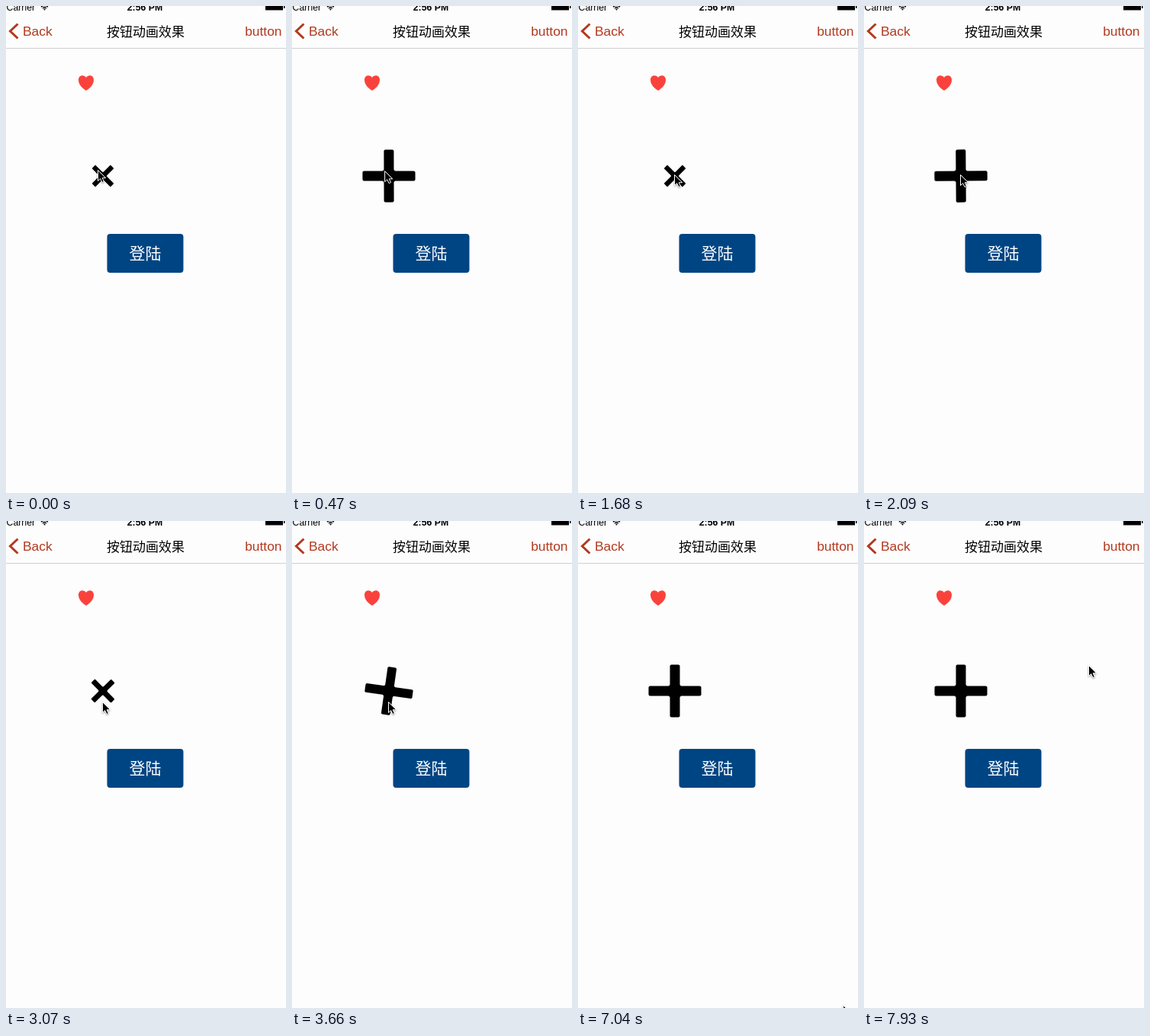
An HTML page for the animation above (7990 ms loop, 367x639 px).

```html
<!DOCTYPE html>
<html lang="zh">
<head>
<meta charset="utf-8">
<style>
  html, body { margin: 0; width: 100%; height: 100%; overflow: hidden; background: #fdfdfd; }
  svg { display: block; width: 367px; height: 639px; }
  text { font-family: "Liberation Sans", Arial, sans-serif; }
  .cjk { font-family: "Noto Sans CJK SC", "Noto Sans CJK", sans-serif; text-anchor: middle; }
</style>
</head>
<body>
<svg viewBox="0 0 367 639">
  <!-- status bar -->
  <g font-size="12.3">
    <text x="0.5" y="5.5">Carrier</text>
    <text x="182" y="5.5" text-anchor="middle" font-weight="bold">2:56 PM</text>
  </g>
  <path d="M46 1.2Q50.500 -2 55 1.200M48 3Q50.500 1 53 3" fill="none" stroke="#000" stroke-width="1.400"/>
  <circle cx="50.500" cy="4.500" r="1.100"/>
  <path d="M340 0H363V5.500H340ZM364 0H365.500V3H364Z"/>

  <!-- navigation bar -->
  <path d="M0 55.500H367" stroke="#d0d0d0"/>
  <path d="M15.500 23.500L5.500 33L15.500 42.500" fill="none" stroke="#b2391f" stroke-width="3"/>
  <g font-size="17.400" fill="#b2391f">
    <text x="22" y="39">Back</text>
    <text x="361.500" y="39" text-anchor="end">button</text>
  </g>
  <text class="cjk" x="183" y="39.500" font-size="17" font-weight="500">按钮动画效果</text>

  <path fill="#fa423c" d="M105 94C103 90 95 90 95 97C95 104 101 108.500 105 111C109 108.500 115 104 115 97C115 90 107 90 105 94Z"/>

  <rect x="132.500" y="299" width="100" height="51" rx="4" fill="#004583"/>
  <text class="cjk" x="182.500" y="332" font-size="21" fill="#fff">登陆</text>

  <g id="plus">
    <rect x="-34.500" y="-6.500" width="69" height="13" rx="2"/>
    <rect x="-6.500" y="-34.500" width="13" height="69" rx="2"/>
    <path d="M14.500 0L0 14.500L-14.500 0L0 -14.500Z"/>
  </g>

  <path id="cursor" d="M.5 .5V14.500L3.700 11.600L6 16.500L8.400 15.400L6.200 10.700H10.700Z"
        stroke="#fff" style="filter: drop-shadow(0 1px 1px #0006)"/>
</svg>
<script>
const LOOP = 7990;
const plus = document.getElementById('plus');
const cursor = document.getElementById('cursor');

// Taps alternate between opening to a plus and closing to a small cross.
const taps = [60, 930, 1740, 2730, 3540];
const LEAD = 25;

// Pointer path: time, x, y
const path = [
  [0, 120, 215], [300, 120, 215], [600, 122, 217], [1350, 122, 217],
  [1600, 126, 221], [2200, 126, 221], [2450, 126, 237], [3750, 126, 237],
  [4100, 331, 645], [7039, 331, 645], [7040, 347, 636], [7095, 355, 582],
  [7150, 370, 570], [7569, 370, 570], [7570, 342, 394], [7690, 305, 279],
  [7870, 305, 279], [7930, 294, 189], [LOOP, 294, 189]
];

// Step response of a damped spring, 0 to 1
function spring(t, halfPeriod, decay) {
  const p = Math.PI * t / halfPeriod;
  return 1 - Math.exp(-decay * p) * (Math.cos(p) + decay * Math.sin(p));
}

function pointer(t) {
  const i = path.findIndex(k => k[0] > t);
  const [t0, x0, y0] = path[i - 1], [t1, x1, y1] = path[i];
  const u = (t - t0) / (t1 - t0);
  return [x0 + (x1 - x0) * u, y0 + (y1 - y0) * u];
}

function plusPose(t) {
  const count = taps.filter(tap => tap <= t).length;
  if (!count) return [45, 0.5];
  const age = t - taps[count - 1] + LEAD;
  const smooth = age > 780 ? 1 : spring(age, 300, 1.33);
  if (count % 2) return [45 * (1 - smooth), 0.5 + 0.5 * smooth];
  const bouncy = age > 780 ? 1 : spring(age, 165, 0.374);
  return [45 * smooth, 1 - 0.5 * bouncy];
}

function draw(now) {
  const t = now % LOOP;
  const [angle, scale] = plusPose(t);
  plus.setAttribute('transform', `translate(127 223) rotate(${angle}) scale(${scale})`);
  cursor.setAttribute('transform', `translate(${pointer(t)})`);
  requestAnimationFrame(draw);
}
draw(0);
</script>
</body>
</html>
```
